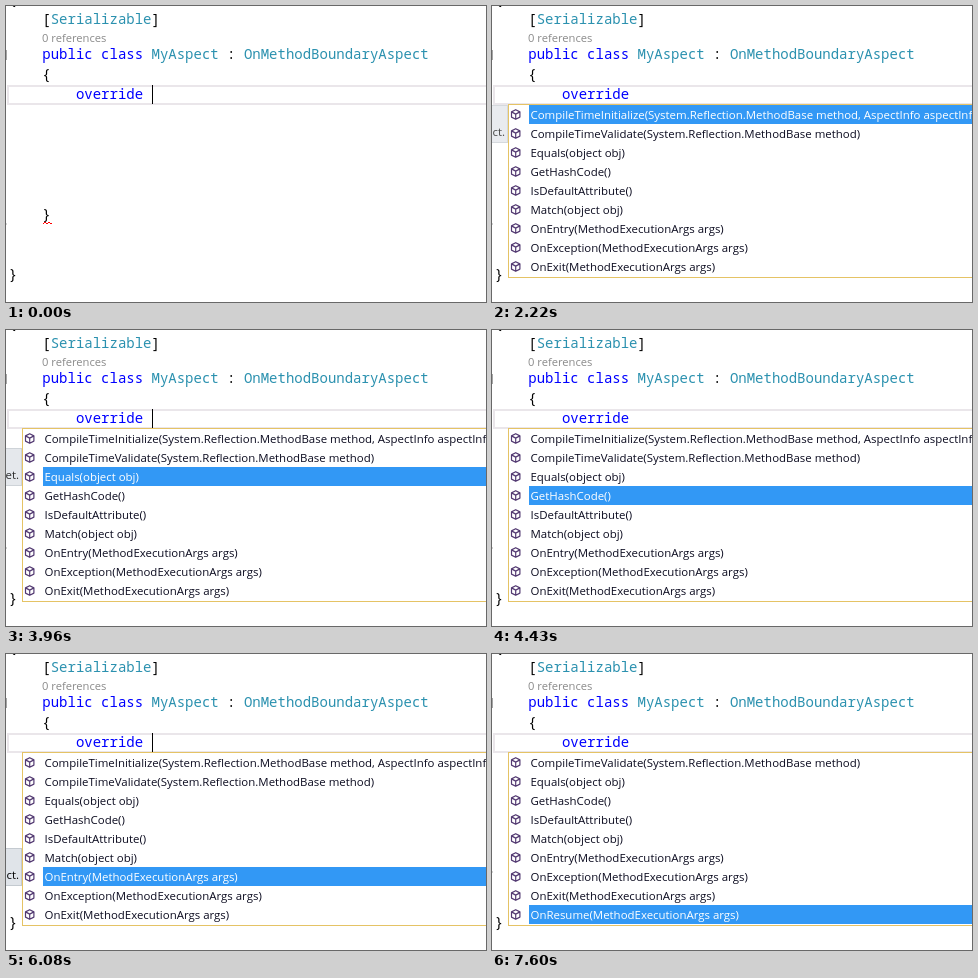
Animation, 480 px wide and 296 px high, one loop 8000 ms. Source, as an HTML page:

```html
<!DOCTYPE html>
<html lang="en">
<head>
<meta charset="utf-8">
<title>Code completion</title>
<style>
@property --row { syntax: "<integer>"; inherits: true; initial-value: 0; }
@property --scroll { syntax: "<integer>"; inherits: true; initial-value: 0; }

html, body { margin: 0; width: 100%; height: 100%; overflow: hidden; background: #fff; }
.stage { position: relative; width: 480px; height: 296px; overflow: hidden; background: #fff; }
.stage div, .stage svg { position: absolute; }
.caret, .popup, .list, .soft, .sel, .tip { animation: 8s step-end infinite; }

/* Editor */
pre {
  position: absolute; left: 2.7px; top: -17px; margin: 0; color: #000;
  font: 14px/20px "Noto Sans Mono", monospace;
}
.kw { color: #00f; }
.type { color: #2b91af; }
.refs {
  display: block; height: 15px; padding-left: 33.3px; color: #8a8a8a;
  font: 11.2px/17px "Open Sans", sans-serif;
}
.current-line {
  left: 1px; top: 79px; width: 520px; height: 16px;
  border: 2px solid #eae6ea;
}
.caret { left: 146px; top: 79px; width: 1px; height: 19px; background: #000; animation-name: caret; }
.squiggle { left: 36px; top: 214px; fill: none; stroke: #f00; }
.margin-mark { left: 0; width: 1px; background: #a5a5a5; }

/* Completion list */
.popup {
  left: 16px; top: 98px; width: 600px; height: 172px; overflow: hidden;
  border: 1px solid #e5c365; background: #fff; animation-name: popup;
}
.list {
  inset: 0; color: #0c0c20; animation-name: pick;
  font: 11.45px/19px "Open Sans", sans-serif; white-space: pre;
}
.names { left: 21.5px; top: calc(var(--scroll) * -19px); }
.sel {
  left: 20px; top: calc(var(--row) * 19px); width: 580px; height: 19px;
  overflow: hidden; background: #3298f5; color: #fff; animation-name: sel;
}
.sel .names { left: 1.5px; top: calc((var(--row) + var(--scroll)) * -19px); }
.soft {
  left: 20px; top: 0; width: 580px; height: 17px;
  border: 1px solid #3298f5; animation-name: soft;
}
.icons { left: 0; top: 0; fill: none; stroke: #533a72; stroke-width: 1.2; stroke-linejoin: round; }

/* Tooltip: only its right end is on the stage */
.tip {
  right: 464px; top: calc(99px + var(--at) * 19px); width: 500px; height: 36px;
  border: 1px solid #c4cad0; background: #e0e4e9; color: #000; opacity: 0;
  font: 11.45px/16px "Open Sans", sans-serif; white-space: nowrap;
}
.tip span { position: absolute; right: 2px; top: 18px; }

@keyframes popup { 0% { opacity: 0 } 10.625%, 100% { opacity: 1 } }
@keyframes soft { 0% { opacity: 1 } 23.625%, 100% { opacity: 0 } }
@keyframes sel { 0% { opacity: 0 } 23.625%, 100% { opacity: 1 } }
@keyframes caret {
  0%, 9.875%, 21.625%, 34.875%, 46.625%, 59.875%, 74.375%, 85.375% { opacity: 1 }
  2.875%, 15.625%, 27.75%, 39.875%, 55%, 65.625%, 79.125%, 91.25%, 100% { opacity: 0 }
}
@keyframes pick {
  0% { --row: 0; --scroll: 0 }
  34.125% { --row: 1 }
  49.5% { --row: 2 }
  55.375% { --row: 3 }
  60.25% { --row: 4 }
  64% { --row: 5 }
  75.625% { --row: 6 }
  86.5% { --row: 7 }
  88.375% { --row: 8 }
  95%, 100% { --row: 8; --scroll: 1 }
}
@keyframes tip-initialize {
  0%, 30%, 100% { opacity: 0 }
  19.375% { opacity: 0; animation-timing-function: steps(7, jump-start) }
  22% { opacity: 1 }
  27.375% { opacity: 1; animation-timing-function: steps(7, jump-start) }
}
@keyframes tip-validate {
  0%, 52.125%, 100% { opacity: 0 }
  44% { opacity: 0; animation-timing-function: steps(8, jump-start) }
  47% { opacity: 1 }
  49.5% { opacity: 1; animation-timing-function: steps(6, jump-start) }
}
@keyframes tip-match {
  0%, 79.5%, 100% { opacity: 0 }
  74.375% { opacity: 0; animation-timing-function: steps(3, jump-start) }
  75.5% { opacity: 1 }
  77.25% { opacity: 1; animation-timing-function: steps(6, jump-start) }
}
@keyframes tip-entry {
  0%, 88%, 100% { opacity: 0 }
  85.375% { opacity: 0; animation-timing-function: steps(3, jump-start) }
  86.5% { opacity: 1; animation-timing-function: steps(4, jump-start) }
}
</style>
</head>
<body>
<div class="stage">
  <div class="current-line"></div>
  <pre>{
    [<span class="type">Serializable</span>]
<span class="refs">0 references</span>    <span class="kw">public</span> <span class="kw">class</span> <span class="type">MyAspect</span> : <span class="type">OnMethodBoundaryAspect</span>
    {
        <span class="kw">override</span>





    }


}</pre>
  <svg class="squiggle" width="12" height="6"><path d="M1 4l2-2 2 2 2-2 2 2 1-1"/></svg>
  <div class="margin-mark" style="top:44px;height:10px"></div>
  <div class="margin-mark" style="top:217px;height:2px;opacity:.5"></div>
  <div class="caret"></div>

  <div class="tip" style="--at:0;animation-name:tip-initialize"><span>the current aspect.</span></div>
  <div class="tip" style="--at:1;animation-name:tip-validate"><span>to the right target.</span></div>
  <div class="tip" style="--at:5;animation-name:tip-match"><span>equals a specified object.</span></div>
  <div class="tip" style="--at:6;animation-name:tip-entry"><span>this aspect is applied.</span></div>

  <div class="popup">
    <svg class="icons" width="20" height="172"></svg>
    <div class="list">
      <div class="names"></div>
      <div class="soft"></div>
      <div class="sel"><div class="names"></div></div>
    </div>
  </div>
</div>
<script>
const members = [
  "CompileTimeInitialize(System.Reflection.MethodBase method, AspectInfo aspectInfo)",
  "CompileTimeValidate(System.Reflection.MethodBase method)",
  "Equals(object obj)",
  "GetHashCode()",
  "IsDefaultAttribute()",
  "Match(object obj)",
  ...["Entry", "Exception", "Exit", "Resume"].map(name => `On${name}(MethodExecutionArgs args)`)
];
for (const names of document.querySelectorAll(".names")) names.textContent = members.join("\n");

const cube = "M0-4.8 4.2-2.6V2.6L0 4.8-4.2 2.6V-2.6ZM-4.2-2.6 0-.4 4.2-2.6M0-.4V4.8";
document.querySelector(".icons").innerHTML = Array.from({ length: 9 }, (_, row) =>
  `<path transform="translate(6.7 ${row * 19 + 9.5})" d="${cube}"/>`).join("");
</script>
</body>
</html>
```
